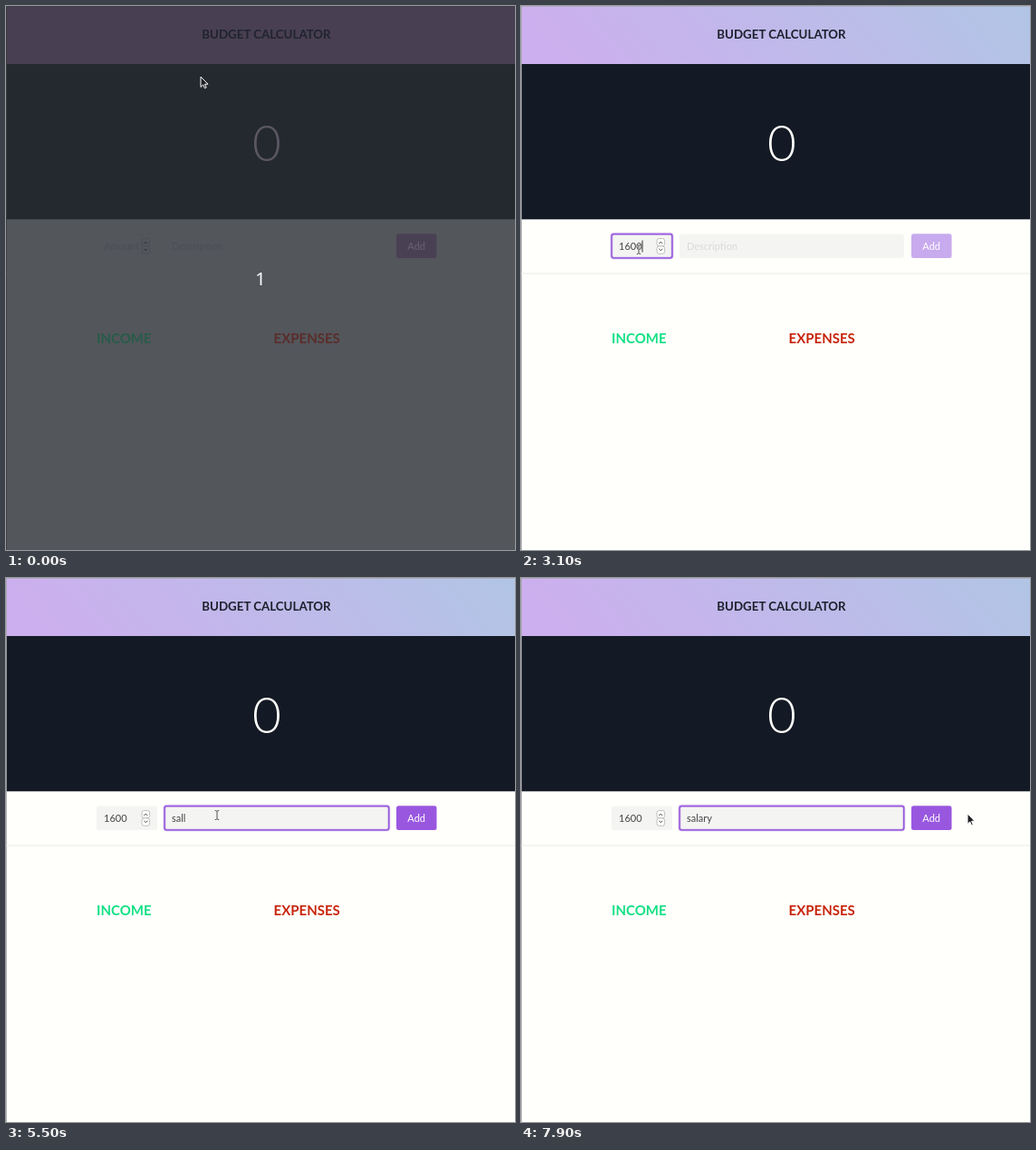
Write an HTML page that moves like this. It is 562 px wide and 600 px high and loops after 8000 ms.

```html
<!DOCTYPE html>
<html lang="en">
<head>
<meta charset="utf-8">
<title>Budget calculator</title>
<style>
  html, body { margin: 0; width: 100%; height: 100%; overflow: hidden; background: #fffffc; }
  svg { display: block; width: 562px; height: 600px; font-family: Lato, "Open Sans", sans-serif;
    --page: #fffffc; --dark: #141a25; --title: #1b202c; --total: #fffffc; --field: #f4f4f2;
    --hint: #d9d9d7; --line: #e9e9e7; --btn: #c8aaee; --label: #fffffc; --in: #14e085; --out: #c8240a;
    --edge: #a9a9ae; --spin: #fffffc; --spinline: #b9b9b7; --mark: #444; }
  svg.dim { --page: #53565b; --dark: #242930; --title: #20242f; --total: #5b5763; --field: #53565b;
    --hint: #4c4e55; --line: #53565b; --btn: #4a4054; --label: #67626f; --in: #285c49; --out: #5a2d2b;
    --edge: #393b3f; --spin: #53565b; --spinline: #4b4d53; --mark: #292c32; }
  svg.dim #header { fill: #493f52; }
  .bold { font-weight: 700; }
  .small { font-size: 11px; }
  .typed { fill: #454548; }
  .hint { fill: var(--hint); }
  .menu { font: 9.6px "Noto Sans", "Open Sans", sans-serif; fill: #fff; }
  .spin rect { fill: var(--spin); stroke: var(--spinline); stroke-width: .9; }
  .spin path { fill: none; stroke: var(--mark); stroke-width: 1; }
  .ring { fill: none; stroke: #9657de; stroke-width: 1.5; }
  .halo { fill: none; stroke: #9657de; stroke-width: 3.2; opacity: .28; }
  .hover { fill: none; stroke: #d4d4d2; }
</style>
</head>
<body>
<svg id="stage" viewBox="0 0 562 600">
  <defs>
    <linearGradient id="sky" x1="0" y1=".1" x2="1" y2="0">
      <stop offset="0" stop-color="#ccafee"/>
      <stop offset="1" stop-color="#b1c5e5"/>
    </linearGradient>
    <filter id="soft" x="-5%" y="-30%" width="110%" height="170%">
      <feGaussianBlur stdDeviation="1.3"/>
    </filter>
  </defs>
  <rect width="562" height="600" fill="var(--page)"/>
  <rect id="header" width="562" height="64" fill="url(#sky)"/>
  <rect y="64" width="562" height="171.3" fill="var(--dark)"/>
  <rect width="562" height="1" fill="var(--edge)" opacity=".6"/>
  <rect width="1" height="600" fill="var(--edge)" opacity=".85"/>
  <text class="bold" x="287.5" y="36.3" font-size="13.3" text-anchor="middle" fill="var(--title)">BUDGET CALCULATOR</text>
  <text x="288" y="170.5" font-size="55" font-weight="300" text-anchor="middle" fill="var(--total)">0</text>
  <rect y="294.5" width="562" height="1" fill="var(--line)"/>

  <g id="amount"></g>
  <g id="desc"></g>
  <g class="spin">
    <rect x="150" y="256.5" width="8.6" height="8.4" rx="2.4"/>
    <rect x="150" y="264.9" width="8.6" height="8.4" rx="2.4"/>
    <path d="M152.4 262l1.9-1.9 1.9 1.9M152.4 267.8l1.9 1.9 1.9-1.9"/>
  </g>
  <rect id="btn" x="431" y="251.3" width="44.5" height="26.7" rx="2.5"/>
  <text class="small" x="453.2" y="268.9" text-anchor="middle" fill="var(--label)">Add</text>

  <text class="bold" x="100" y="371.6" font-size="15" fill="var(--in)">INCOME</text>
  <text class="bold" x="295.6" y="371.6" font-size="15" fill="var(--out)">EXPENSES</text>

  <g id="menu"></g>
  <rect id="caret" y="258.5" width="1" height="13" fill="#333"/>
  <g id="arrow">
    <path d="M0 0V11.4L2.7 8.9 4.4 12.7 6.2 11.9 4.5 8.2H8Z" fill="#1e1e20" stroke="#fff" stroke-width="1" stroke-linejoin="round"/>
  </g>
  <g id="beam" fill="none">
    <path d="M-2.2 -5Q0 -5 0 -4Q0 -5 2.2 -5M0 -4V4M-2.2 5Q0 5 0 4Q0 5 2.2 5" stroke="#fff" stroke-width="2.2" opacity=".6"/>
    <path d="M-2.2 -5Q0 -5 0 -4Q0 -5 2.2 -5M0 -4V4M-2.2 5Q0 5 0 4Q0 5 2.2 5" stroke="#4a4a4a" stroke-width="1"/>
  </g>
  <text id="count" x="281" y="307.6" font-size="20" text-anchor="middle" fill="#fff" font-family="Noto Sans, Open Sans, sans-serif">1</text>
</svg>
<script>
const LOOP = 8000, TICK = 100;
const $ = id => document.getElementById(id);
const show = (el, on) => { el.style.display = on ? '' : 'none'; };

function field(id, x, w, hint) {
  const box = `x="${x}" y="251.4" width="${w}" height="26.6" rx="2.5"`;
  const g = $(id);
  g.innerHTML = `<rect ${box} fill="var(--field)"/>` +
    `<rect class="hover" x="${x + .5}" y="251.9" width="${w - 1}" height="25.6" rx="2.3"/>` +
    `<rect class="halo" ${box}/><rect class="ring" ${box}/>` +
    `<text class="small" x="${x + 8}" y="268.9"></text>`;
  const [, hover, halo, ring, text] = g.children;
  return {
    set(value, focused, hovered) {
      show(hover, hovered);
      show(halo, focused);
      show(ring, focused);
      text.textContent = value || hint;
      text.setAttribute('class', 'small ' + (value ? 'typed' : 'hint'));
    },
    caret: value => x + 8 + (value ? text.getComputedTextLength() : 0)
  };
}

const fields = {
  amount: field('amount', 100, 67, 'Amount'),
  desc: field('desc', 175, 247.8, 'Description')
};

const one = ['salary'], many = ['salary', 'shoes', 'snacks', 'sport'];

// each step changes part of the form
const steps = [
  [0, { amount: '', desc: '', focus: '', hover: '', caret: false, rows: [], pick: false, ready: false }],
  [1500, { hover: 'amount' }],
  [1800, { focus: 'amount', caret: true }],
  [2300, { amount: '1' }],
  [2700, { amount: '16' }],
  [2900, { amount: '160' }],
  [3100, { amount: '1600' }],
  [4000, { hover: 'desc' }],
  [4500, { focus: 'desc' }],
  [4700, { desc: 's', ready: true }],
  [4800, { rows: many }],
  [5000, { desc: 'sa' }],
  [5100, { rows: one }],
  [5200, { desc: 'sal' }],
  [5400, { desc: 'sall' }],
  [5500, { rows: [], caret: false }],
  [6300, { desc: 'sal', caret: true }],
  [6400, { rows: one }],
  [6600, { caret: false }],
  [6900, { pick: true }],
  [7100, { desc: 'salary', caret: true, pick: false }],
  [7200, { rows: [] }],
  [7900, { caret: false }]
];

// pointer moves: first step, last step, end point, shape
const moves = [
  [0, 0, 215, 78, 'arrow'],
  [800, 1300, 143, 235, 'arrow'],
  [1500, 1600, 130, 268.5, 'beam'],
  [4000, 4200, 233, 261.5, 'beam'],
  [6300, 6300, 233, 262, 'arrow'],
  [6800, 6900, 238, 284, 'arrow'],
  [7400, 7600, 556, 239, 'arrow'],
  [7900, 7900, 493, 260, 'arrow']
];

function pointer(t) {
  let p = { x: 215, y: 78, kind: 'arrow' };
  for (const [from, to, x, y, kind] of moves) {
    if (t < from) break;
    const n = (to - from) / TICK + 1;
    const k = Math.min(1, (Math.floor((t - from) / TICK) + 1) / n);
    const e = k * k * (3 - 2 * k);
    p = { x: p.x + (x - p.x) * e, y: p.y + (y - p.y) * e, kind };
  }
  return p;
}

function menu(rows, pick) {
  if (!rows.length) return '';
  const h = 2.7 + 13.3 * rows.length;
  return `<rect x="175" y="279" width="247.5" height="${h}" fill="#000" opacity=".35" filter="url(#soft)"/>` +
    `<rect x="175" y="278" width="247.5" height="${h}" fill="#31312e"/>` +
    (pick ? '<rect x="176" y="279.2" width="245.5" height="13.6" fill="#f07746"/>' : '') +
    rows.map((r, i) => `<text class="menu" x="179.7" y="${289.6 + 13.3 * i}">${r}</text>`).join('');
}

let last = -1;
function draw(now) {
  const t = Math.floor((now % LOOP) / TICK) * TICK;
  if (t !== last) {
    last = t;
    const s = Object.assign({}, ...steps.filter(([at]) => at <= t).map(([, part]) => part));
    const dim = t < 100;
    $('stage').setAttribute('class', dim ? 'dim' : '');
    show($('count'), dim);
    for (const id in fields) fields[id].set(s[id], s.focus === id, s.hover === id);
    $('btn').setAttribute('fill', s.ready ? '#9957e0' : 'var(--btn)');
    $('menu').innerHTML = menu(s.rows, s.pick);
    show($('caret'), s.caret);
    if (s.caret) $('caret').setAttribute('x', fields[s.focus].caret(s[s.focus]));
    const p = pointer(t);
    for (const kind of ['arrow', 'beam']) {
      show($(kind), p.kind === kind);
      $(kind).setAttribute('transform', `translate(${p.x} ${p.y})`);
    }
  }
  requestAnimationFrame(() => draw(performance.now() - start));
}

const start = performance.now();
draw(0);
</script>
</body>
</html>
```
